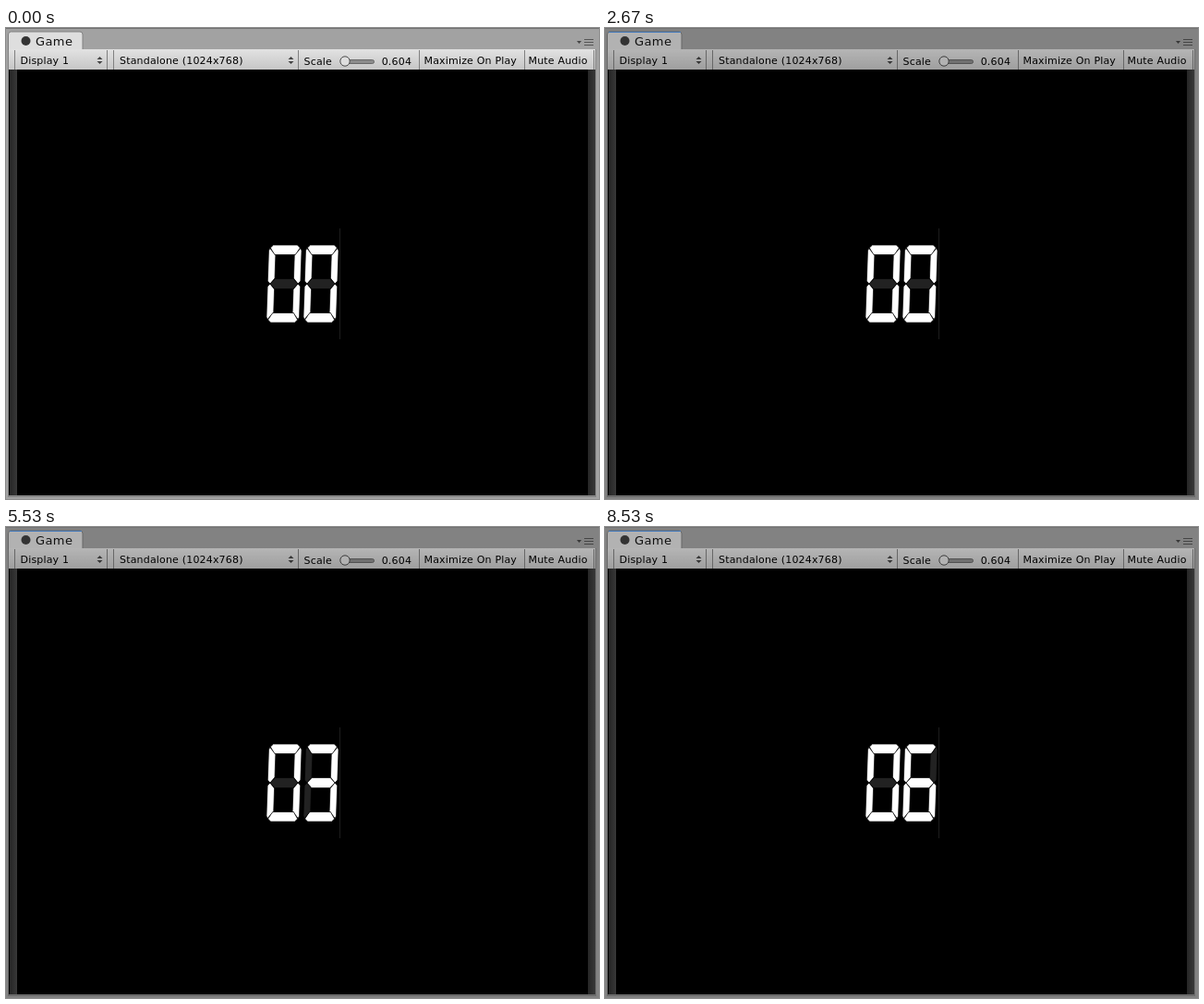
An HTML page that plays this animation: 642 px wide and 510 px high, repeating every 8670 ms.

```html
<!DOCTYPE html>
<html lang="en">
<head>
<meta charset="utf-8">
<title>Seven-segment counter</title>
<style>
  html, body { margin: 0; width: 100%; height: 100%; overflow: hidden; background: #000; }
  svg { display: block; width: 642px; height: 510px; }
  text { font: 11px "DejaVu Sans", sans-serif; letter-spacing: .18px; fill: #000; }
  .tab { font-size: 13px; letter-spacing: .4px; fill: #111; }
</style>
</head>
<body>
<svg viewBox="0 0 642 510">
  <defs>
    <linearGradient id="bar" x2="0" y2="1">
      <stop stop-color="#e2e2e2"/><stop offset="1" stop-color="#c6c6c6"/>
    </linearGradient>
    <linearGradient id="side">
      <stop stop-color="#262626"/><stop offset="1" stop-color="#383838"/>
    </linearGradient>
    <path id="arrows" d="M-3-1L0-4 3-1zM-3 1L0 4 3 1z" fill="#444"/>
    <!-- segments around the centre of a digit -->
    <path id="top" d="M-16-39L-13-42H13L16-39 11.5-31.5H-11.5z"/>
    <path id="edge" d="M16.5-38.5L17.8-36V-3L15 0 10.2-6V-30.5z"/>
    <path id="mid" d="M-15 0L-10-5.5H10L15 0 10 5.5H-10z"/>
  </defs>

  <!-- window chrome -->
  <rect width="642" height="510" fill="#a2a2a2"/>
  <rect x="2" y="23" width="637" height="485" fill="#858585"/>
  <path d="M2.5 24V7q0-3 3-3H80q3 0 3 3V24" fill="#dedede" stroke="#808080"/>
  <rect x="3" y="23" width="635" height="22" fill="url(#bar)"/>
  <path id="dividers" stroke="#808080"/>
  <use href="#arrows" x="101.5" y="35"/>
  <use href="#arrows" x="308.5" y="35"/>
  <rect x="365.5" y="34.5" width="33" height="4" rx="2" fill="#8c8c8c" stroke="#686868"/>
  <circle cx="367" cy="36" r="5.2" fill="#dedede" stroke="#4c4c4c"/>
  <path d="M618 14h5l-2.5 3z" fill="#444"/>
  <path d="M626 12.5h10M626 15.5h10M626 18.5h10" stroke="#555"/>
  <rect id="tint" y="1" width="642" height="509" opacity=".2"/>
  <path d="M0 .5H642" stroke="#727272"/>
  <path id="focus" d="M4 4.5H82" stroke="#3f76b8"/>

  <circle cx="21.5" cy="14" r="5" fill="#333"/>
  <text class="tab" x="32" y="19">Game</text>
  <text x="15.5" y="39">Display 1</text>
  <text x="123" y="39">Standalone (1024x768)</text>
  <text x="322.5" y="40">Scale</text>
  <text x="406.7" y="40">0.604</text>
  <text x="452.5" y="39">Maximize On Play</text>
  <text x="565.5" y="39">Mute Audio</text>

  <!-- game view -->
  <rect x="3" y="45" width="635" height="461"/>
  <rect x="4" y="45" width="8" height="461" fill="url(#side)"/>
  <rect x="630" y="45" width="8" height="461" fill="url(#side)"/>
  <path id="caret" d="M361.5 217V337" stroke="#1c1c1c"/>
  <g id="tens" transform="translate(301 277) skewX(-2)" stroke="#000" stroke-width=".7"></g>
  <g id="ones" transform="translate(341 277) skewX(-2)" stroke="#000" stroke-width=".7"></g>
</svg>
<script>
const $ = id => document.getElementById(id);

// each segment mirrors one of three shapes
const segments = {
  a: ["top", 1, 1], b: ["edge", 1, 1], c: ["edge", 1, -1], d: ["top", 1, -1],
  e: ["edge", -1, -1], f: ["edge", -1, 1], g: ["mid", 1, 1]
};
const lit = ["abcdef", "bc", "abged", "abgcd", "fgbc", "afgcd", "afgedc"];

function show(id, n) {
  $(id).innerHTML = Object.entries(segments).map(([name, [shape, sx, sy]]) =>
    `<use href="#${shape}" transform="scale(${sx} ${sy})" fill="${lit[n].includes(name) ? "#fff" : "#222"}"/>`
  ).join("");
}

function visible(id, on) {
  $(id).setAttribute("visibility", on ? "visible" : "hidden");
}

function draw() {
  const t = performance.now() % 8670;
  visible("tint", t >= 1070);
  visible("focus", t >= 2470);
  visible("caret", t < 2470 || t >= 2670);
  show("ones", Math.max(0, Math.floor((t - 2530) / 1000)));
  requestAnimationFrame(draw);
}

$("dividers").setAttribute("d",
  [9.5, 109.5, 116.5, 316.5, 447.5, 561.5, 636.5].map(x => `M${x} 24V45`).join(""));
show("tens", 0);
draw();
</script>
</body>
</html>
```
